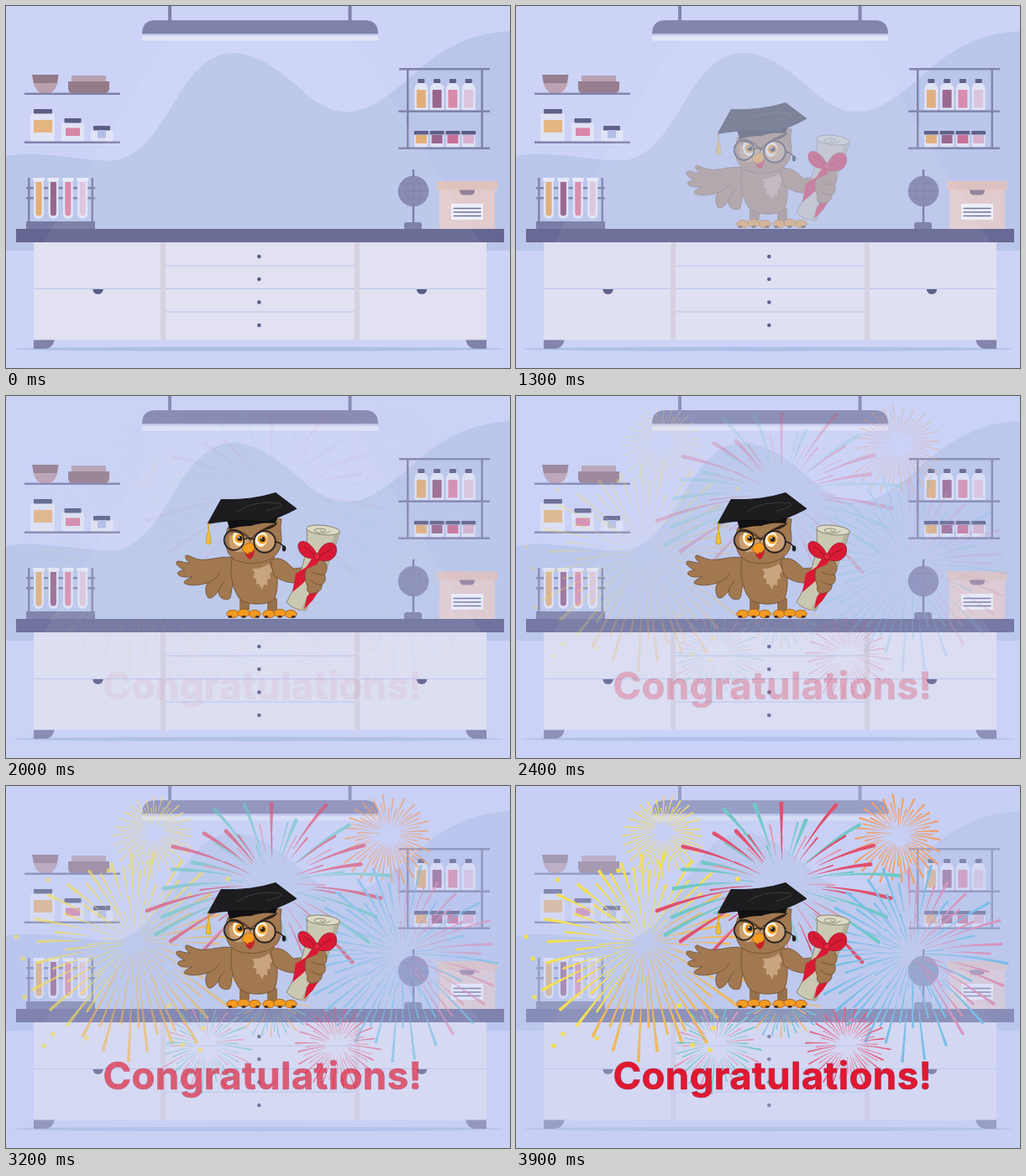
These frames come from a looping animation (600x432 px, 4 s). An HTML page:

```html
<!DOCTYPE html>
<html lang="en">
<head>
<meta charset="utf-8">
<title>Congratulations</title>
<style>
  html, body { margin: 0; width: 100%; height: 100%; overflow: hidden; background: #ccd3f7; }
  svg { display: block; width: 100vw; height: 100vh; }
</style>
</head>
<body>
<svg id="stage" viewBox="0 0 600 432"></svg>
<script>
const LOOP = 4000, STEP = 100;
const STEEL = '#8082aa', DARK = '#5c5d84', GLASS = '#e1e4f6';
const LIQUIDS = ['#e2ae78', '#98658c', '#d88aab', '#dcc4dc'];

const rect = (x, y, w, h, fill, r = 0) =>
  `<rect x="${x}" y="${y}" width="${w}" height="${h}" rx="${r}" fill="${fill}"/>`;
const path = (d, fill, extra = '') => `<path d="${d}" fill="${fill}" ${extra}/>`;
const line = (d, stroke, w) =>
  `<path d="${d}" fill="none" stroke="${stroke}" stroke-width="${w}" stroke-linecap="round"/>`;
const dot = (x, y, r, fill, extra = '') =>
  `<circle cx="${x}" cy="${y}" r="${r}" fill="${fill}" ${extra}/>`;
const oval = (x, y, rx, ry, fill, extra = '') =>
  `<ellipse cx="${x}" cy="${y}" rx="${rx}" ry="${ry}" fill="${fill}" ${extra}/>`;
const group = (id, body) => `<g id="${id}">${body}</g>`;

function random(seed) {
  return () => {
    seed = (seed * 16807) % 2147483647;
    return seed / 2147483647;
  };
}

function wall() {
  return rect(0, 0, 600, 432, '#ccd3f7') +
    path('M0 179C40 171 98 187 130 184C160 180 180 150 205 107C224 76 245 56 270 56C305 56 335 86 360 107C380 123 395 127 408 126C432 125 452 110 480 86C515 54 550 32 600 30V292H0Z', '#b9c6ea');
}

function lamp() {
  return rect(193, 0, 4, 18, STEEL) + rect(407.5, 0, 4, 18, STEEL) +
    path('M162 33Q162 17 178 17H427Q443 17 443 33Z', STEEL) +
    rect(162, 33, 281, 2.5, '#bfc6ea') + rect(162, 35.5, 281, 6, '#e4e6f8');
}

function jar(x, y, w, lidX, lidW, label) {
  return rect(x, y, w, 162 - y, GLASS, 2) + rect(lidX, y - 5, lidW, 5.5, DARK, 1) + label;
}

function leftShelves() {
  return path('M32 84H62C62 96 57 104 50 104H44C37 104 32 96 32 84Z', '#bb9fae') +
    path('M31 82H62.500L60.500 92H33Z', '#937a89') +
    rect(78, 83, 41, 8, '#b8a0b0') + path('M74 90H123V99Q122 104 118 104H79Q75 104 74 99Z', '#957b8a') +
    jar(29, 128, 29, 33, 22, rect(33, 136, 22, 15, '#e5b57f')) +
    jar(66, 139, 27, 69.5, 20, rect(71, 145.5, 17, 9.5, '#d985a8')) +
    jar(101, 148, 26.5, 104, 20, rect(109, 148, 10, 9.5, '#b2bee5')) +
    rect(22, 103.5, 114, 2.5, STEEL) + rect(22, 161.5, 114, 2.5, STEEL);
}

function tubes() {
  let s = rect(24, 216, 82, 2.5, STEEL) + rect(24, 228, 82, 2.5, STEEL) +
    rect(26, 205, 2.5, 53, STEEL) + rect(101.5, 205, 2.5, 53, STEEL);
  LIQUIDS.forEach((c, i) => {
    const x = 39 + i * 17.4;
    s += rect(x - 6, 206, 12, 48, GLASS, 6) + rect(x - 7, 205, 14, 4, '#e8eaf8', 1) +
      path(`M${x - 3.500} 210h7v37a3.500 3.500 0 0 1-7 0Z`, c);
  });
  return s + rect(24, 257, 82, 10, '#777aa3');
}

function rightShelves() {
  let s = rect(477, 75, 2.5, 95, STEEL) + rect(565.5, 75, 2.5, 95, STEEL);
  ['#e2ae78', '#98658c', '#c96f96', '#d6b0cc'].forEach((c, i) => {
    const x = 494.3 + i * 18.8;
    s += path(`M${x - 4} 92H${x + 4}Q${x + 8} 95 ${x + 8} 99V124H${x - 8}V99Q${x - 8} 95 ${x - 4} 92Z`, GLASS) +
      rect(x - 4, 87, 8, 5, DARK, 1) + rect(x - 5.5, 100, 11, 21.5, LIQUIDS[i], 1) +
      rect(x - 8, 153, 16, 15.5, GLASS, 2) + rect(x - 6.5, 154, 13, 10, c) +
      rect(x - 8.5, 149, 17, 4.5, DARK, 1);
  });
  return s + rect(468, 74, 108, 2.5, STEEL) + rect(467, 124.5, 109, 2.5, STEEL) +
    rect(467, 168.5, 109, 2.5, STEEL);
}

function globe() {
  return rect(483.8, 195, 2.4, 66, '#7476a0') + rect(474, 258, 21, 9, '#777aa3', 3) +
    dot(485, 221, 18.3, '#8386b1') +
    line('M467 221H503M470 212H500M470 230H500M485 203V239M485 203Q467 221 485 239M485 203Q503 221 485 239', '#7577a3', .6);
}

function carton() {
  return rect(516, 218, 66, 48, '#e2cbcc') + rect(513, 209, 72, 10.5, '#dfc2be', 1) +
    path('M540 219.500H558Q558 225.500 553 225.500H545Q540 225.500 540 219.500Z', '#92819b') +
    rect(530, 236, 38, 19, '#eef0fa') +
    line('M533 241.500H565M533 246H565M533 250.500H565', '#6e7099', 1.4);
}

function desk() {
  let s = oval(300, 409.3, 292, 2.6, '#adbfe6') +
    path('M33 397H58Q56 409 46 409H33Z', STEEL) + path('M572 397H547Q549 409 559 409H572Z', STEEL) +
    rect(33, 281, 539, 117.5, '#e1e1f2') +
    rect(184, 282, 6, 116.5, '#d6d2e0') + rect(415, 282, 6, 116.5, '#d6d2e0') +
    rect(33, 337, 151, 1, '#b9c7ea') + rect(421, 337, 151, 1, '#b9c7ea');
  [310, 337.5, 365].forEach(y => s += rect(190, y - .5, 225, 1, '#b6c5ea'));
  [299, 326, 353.5, 381].forEach(y => s += dot(301.3, y, 2.3, DARK));
  [109.5, 495].forEach(x => s += path(`M${x - 6.200} 338h12.400a6.200 6 0 0 1-12.400 0Z`, DARK));
  return s + rect(12, 266, 581, 16, '#646590');
}

// One tapered ray that falls by g * distance².
function ray(cx, cy, angle, from, to, w, color, g) {
  const dx = Math.cos(angle), dy = Math.sin(angle);
  const at = (s, drop, side) =>
    `${(cx + dx * s - dy * side).toFixed(1)} ${(cy + dy * s + drop * g + dx * side).toFixed(1)}`;
  const mid = (from + to) / 2, h = w / 2;
  return path(`M${at(from, from * from, .2)}Q${at(mid, from * to, h * .6)} ${at(to, to * to, h)}` +
    `A${h} ${h} 0 0 0 ${at(to, to * to, -h)}Q${at(mid, from * to, -h * .6)} ${at(from, from * from, -.2)}Z`, color);
}

function burst({ x, y, r, n, w, color, seed, inner = .3, g = 0, start = 0, sweep = Math.PI * 2 }) {
  const rnd = random(seed);
  let s = '';
  for (let i = 0; i < n; i++) {
    const a = start + sweep * (i + rnd() * .4) / n;
    const len = r * (i % 2 ? .6 + rnd() * .2 : .84 + rnd() * .16);
    s += ray(x, y, a, len * (inner + rnd() * .2), len, w * (i % 2 ? .75 : 1), color(i, a), g);
  }
  return s;
}

const cycle = (...colors) => i => colors[i % colors.length];

function fireworks() {
  const red = '#e0506f', teal = '#70c8c6', blue = '#79bfe8', pink = '#d795bd';
  const yellow = '#f2de58', gold = '#efb95c';
  const tips = [[168, 150], [188, 122], [198, 98], [199, 69], [236, 54], [248, 23], [284, 18], [316, 17],
    [345, 39], [381, 17], [391, 57], [409, 42], [426, 68], [422, 92], [456, 105], [446, 134],
    [441, 158], [432, 190], [412, 215], [196, 189], [178, 181], [186, 158], [222, 216], [222, 90], [262, 52]];
  const warm = (i, a) => Math.cos(a - .7) > .1 ? gold : yellow;
  const cool = (i, a) => Math.cos(a + .3) > .2 && i % 3 ? pink : blue;

  let s = burst({ x: 175, y: 55, r: 50, n: 56, w: 1.8, color: cycle('#f0dc70'), seed: 41, inner: .25, g: .0025 }) +
    burst({ x: 455, y: 58, r: 57, n: 52, w: 2.6, color: cycle('#eda070'), seed: 77, inner: .25, g: .0025 }) +
    burst({ x: 153, y: 190, r: 130, n: 54, w: 3.8, color: warm, seed: 512, inner: .35, g: .0009 }) +
    burst({ x: 153, y: 187, r: 60, n: 36, w: 1.5, color: warm, seed: 9, inner: .2, g: .001 });

  const cx = 316, cy = 120, g = .0013;
  tips.forEach(([x, y], i) => {
    const dx = x - cx, fall = g * (dx * dx + (y - cy) ** 2), dy = y - cy - fall;
    const len = Math.hypot(dx, dy);
    s += ray(cx, cy, Math.atan2(dy, dx), len * .4, len, 4.8, i % 5 === 1 || i % 3 === 2 ? teal : red, g);
  });
  s += burst({ x: cx, y: cy, r: 92, n: 36, w: 2.2, color: cycle(red, teal, '#e98fa6'), seed: 33, inner: .4, g });

  s += burst({ x: 471, y: 200, r: 120, n: 54, w: 3.4, color: cool, seed: 621, inner: .35, g: .0009 }) +
    burst({ x: 471, y: 200, r: 58, n: 34, w: 1.4, color: cool, seed: 8, inner: .25, g: .001 }) +
    burst({ x: 238, y: 309, r: 54, n: 46, w: 2, color: cycle(teal, '#92c9d4', '#e09bb8'), seed: 91, inner: .25, g: .002 }) +
    burst({ x: 394, y: 309, r: 52, n: 46, w: 1.9, color: cycle('#e35f82', '#e486a2'), seed: 15, inner: .25, g: .002 }) +
    burst({ x: 316, y: 254, r: 50, n: 24, w: 1.8, color: cycle('#ecb870', blue, teal), seed: 27, inner: .35, start: .2, sweep: 2.75 });

  const sparks = [[50, 112], [12, 180], [20, 206], [22, 252], [45, 310], [83, 125], [264, 111], [122, 101],
    [235, 289], [210, 309], [231, 315], [96, 301], [56, 296], [194, 262]];
  sparks.forEach(([x, y]) => s += dot(x, y, 2.8, yellow));
  return s;
}

function owl() {
  const brown = '#a17850', edge = '#6d4d32', ink = '#222022', paper = '#cbc8b2', crimson = '#d91a34';
  const skin = `stroke="${edge}" stroke-width=".8" stroke-linejoin="round"`;
  const foot = x => [-13, 13, 0].map(d =>
    oval(x + d, 259 + Math.abs(d) * .08, 7.2, 4.6, '#f39b22', 'stroke="#a5590f" stroke-width=".8"') +
    oval(x + d * 1.25, 263.5, 2.6, 1.4, '#4a3020')).join('');
  const eye = (x, y, tilt) => `<g transform="rotate(${tilt} ${x} ${y})">` +
    oval(x, y, 7.5, 9.5, '#fdf8ea', 'stroke="#e8a040" stroke-width="1"') + '</g>' +
    dot(x + 1, y, 5.5, '#f09a1c') + dot(x + 1.5, y, 3, ink) + dot(x + .2, y - 1.6, 1, '#fff');

  const body =
    path('M274 194C262 190 250 194 240 195C228 197 222 192 216 190C211 190 214 196 219 199C212 200 206 195 203 198C202 202 207 205 213 208C207 208 203 210 205 213C208 217 216 216 222 216C214 219 210 222 213 224C220 227 230 226 240 223C236 230 238 238 241 241C246 242 250 237 253 232C252 239 258 245 266 242C270 237 266 228 274 220Z', brown, skin) +
    line('M240 223Q250 219 254 212M253 232Q255 226 260 221', edge, .8) +
    rect(278, 240, 12, 17, '#96704b', 4) + rect(311, 240, 12, 17, '#96704b', 4) +
    path('M271 186C265 206 268 230 279 243C288 250 311 250 319 243C326 230 323 205 318 188Z', brown, skin) +
    path('M293 206Q303 207 313 200L317 209L314 212L315 218L311 219L311 226L307 225L305 231L301 224L298 225L298 218L294 217L296 211Z', '#c8a580') +
    foot(283) + foot(326);

  const arm = path('M315 197C323 190 332 195 342 206Q352 206 362 202L360 220C346 226 330 223 319 214Z', brown, skin);

  const scroll =
    path('M358 158C360 182 354 210 334 246Q343 256 357 256C365 236 386 204 397 162Z', paper, 'stroke="#77745f" stroke-width=".8"') +
    path('M390 167C383 200 362 230 351 256H357C365 236 386 204 397 162Z', '#b3b09a') +
    oval(377.5, 160, 20, 5.6, '#dcd9c6', 'stroke="#77745f" stroke-width=".8" transform="rotate(6 377.5 160)"') +
    line('M386 161C384 165 366 164 367 160C369 157 384 158 380 161C377 163 373 161 375 160', '#77745f', .8) +
    path('M364 200L345 212L341 234L353 224L368 208Z', crimson) +
    path('M370 224L358 240L355 254L365 244L374 230Z', crimson);

  const hand =
    path('M359 203C364 194 377 191 380 199C384 205 381 211 379 213C382 218 379 224 376 225C377 232 370 235 367 235C360 238 357 231 359 227C355 219 355 209 359 203Z', brown, skin) +
    line('M379 213Q370 214 364 210M376 225Q368 226 363 220', edge, .8);

  const bow =
    path('M370 189C364 175 351 169 348 177C347 187 355 195 369 194Z', crimson, 'stroke="#8e0f24" stroke-width=".7"') +
    path('M371 189C375 175 389 171 393 180C396 191 386 201 371 195Z', crimson, 'stroke="#8e0f24" stroke-width=".7"') +
    path('M367 189L356 207L370 201L374 195Z', crimson) +
    line('M355 180Q362 183 367 190M388 183Q380 186 374 191', '#8e0f24', .8) +
    oval(370, 191.5, 3.6, 4, '#e02a40', 'stroke="#8e0f24" stroke-width=".7"');

  const head =
    path('M264 157C258 175 262 194 279 198C298 203 324 197 327 178C330 168 325 163 328 147C318 145 296 148 264 157Z', brown, skin) +
    path('M267 166C262 180 272 190 284 185L290 174Q300 189 314 184C324 176 320 163 308 162L291 170Z', '#c99f74') +
    eye(277, 170, -12) + eye(304, 171, 12) +
    path('M265 159C274 157 284 161 291 170C299 161 310 156 324 151Q318 159 308 160Q297 163 291 174Q284 163 265 162Z', '#6a4a30') +
    path('M291 172C299 161 310 156 324 151Q318 159 308 160Q298 163 291 172Z', '#33241c') +
    path('M284 185L296 184Q295 193 290 195Q285 192 284 185Z', '#c9202c') +
    path('M281 182Q288 170 296 179Q295 188 289 187Q288 191 287 188Q282 187 281 182Z', '#f59c1f', 'stroke="#a5590f" stroke-width=".7"') +
    dot(271.5, 172, 11.8, 'none', `stroke="${ink}" stroke-width="1.7"`) +
    dot(308, 174, 12.8, 'none', `stroke="${ink}" stroke-width="1.7"`) +
    line('M283.500 171Q289 168 295 171M320.500 174Q328 175 331 181', ink, 1.7) + oval(331, 182, 2.3, 3.6, ink);

  const cap =
    path('M263 147Q292 142 323 145L321 152Q304 150 292 155Q278 155 266 159Z', '#121113') +
    path('M240 152.500L256 123.500Q291 125 321 115.500L346 134.500Q324 146 309 150Q274 146 240 152.500Z', '#1d1c1f', 'stroke="#0c0b0d" stroke-width=".8"') +
    line('M275 138Q294 124 326 128Q334 131 310 137', '#4a494d', .7) +
    line('M241 152V164', '#d9a01f', 1.5) + dot(241, 163, 2, '#f2c12f') +
    path('M239.500 164H242.500L244 176Q241 178 238 176Z', '#f2c12f', 'stroke="#b8861a" stroke-width=".6"');

  return body + arm + scroll + hand + bow + head + cap;
}

const title = `<text x="305.4" y="361.5" text-anchor="middle" font-family="Inter, 'Open Sans', sans-serif"
  font-size="45.5" font-weight="700" letter-spacing=".45" fill="#e2182f" stroke="#b0234a" stroke-width=".7">Congratulations!</text>`;

const stage = document.getElementById('stage');
stage.innerHTML = wall() + lamp() + leftShelves() + tubes() + rightShelves() + globe() + carton() + desk() +
  path('M190 42H417L565 282H45Z', '#fff', 'opacity=".05"') +
  group('veil', rect(0, 0, 600, 432, '#bec8f1')) + group('sparks', fireworks()) +
  group('owl', owl()) + group('title', title);

const parts = ['veil', 'sparks', 'owl', 'title'].map(id => document.getElementById(id));
const ramp = (v, from, to) => Math.min(1, Math.max(0, (v - from) / (to - from)));

function draw(ms) {
  const t = Math.floor((ms % LOOP) / STEP) * STEP;
  const party = ramp(t, 1900, 3900);
  const levels = [.4 * ramp(t, 1000, 3900), party, ramp(t, 900, 1900), party];
  parts.forEach((part, i) => part.setAttribute('opacity', levels[i].toFixed(3)));
}

const begin = performance.now();
function tick() {
  draw(performance.now() - begin);
  requestAnimationFrame(tick);
}
tick();
</script>
</body>
</html>
```
